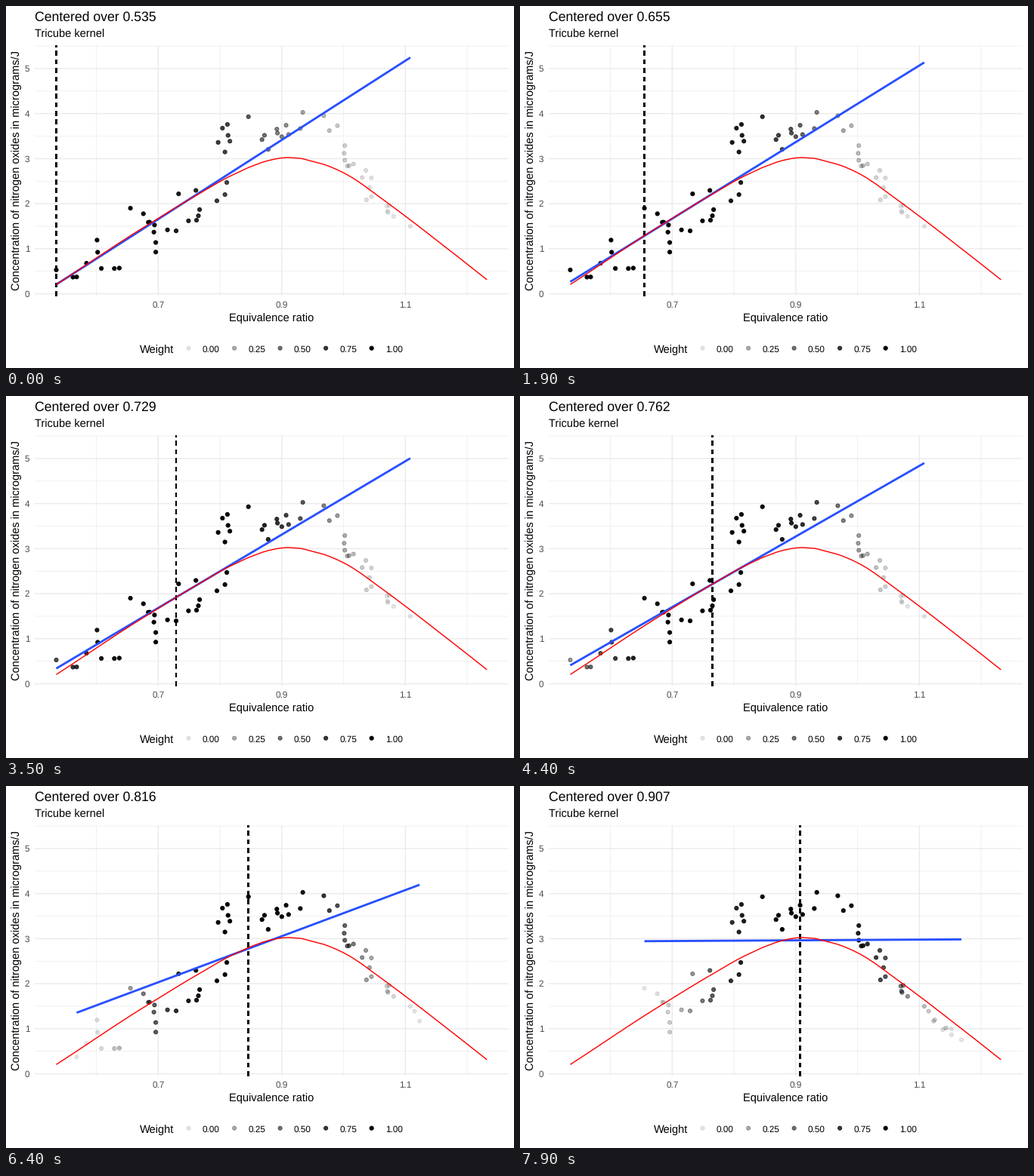
Recreate the animation shown at these times as a matplotlib script. Size 672 by 480 pixels, loop 8000 ms.

```python
import numpy as np
import matplotlib.pyplot as plt
from matplotlib.animation import FuncAnimation
from matplotlib.collections import LineCollection, PolyCollection

W, H, DPI = 672, 480, 96
FRAMES, INTERVAL = 80, 100
PX = 72 / DPI  # points per pixel
LEFT, RIGHT, TOP, BOTTOM = 38.0, 664.67, 52.2, 384.3
NEAREST = 66

plt.rcParams.update({"font.family": "Liberation Sans", "text.hinting": "none"})

# Engine exhaust data: equivalence ratio and nitrogen oxides
ratio = np.array([
    .535, .562, .568, .584, .601, .602, .608, .629, .637, .655, .676, .684,
    .686, .693, .694, .696, .696, .715, .729, .733, .749, .761, .762, .765,
    .767, .795, .797, .804, .808, .808, .811, .812, .813, .816, .846, .868,
    .872, .878, .892, .893, .9, .907, .911, .93, .934, .968, .977, .99,
    1.001, 1.002, 1.002, 1.006, 1.009, 1.016, 1.03, 1.036, 1.037, 1.042,
    1.045, 1.045, 1.07, 1.071, 1.072, 1.074, 1.081, 1.108, 1.115, 1.123,
    1.125, 1.138, 1.142, 1.144, 1.152, 1.152, 1.168])
nox = np.array([
    .53, .37, .374, .678, 1.192, .923, .563, .561, .571, 1.9, 1.777, 1.587,
    1.59, 1.369, 1.527, .926, 1.139, 1.419, 1.397, 2.219, 1.62, 2.295, 1.634,
    1.732, 1.869, 2.064, 3.361, 3.677, 3.148, 2.202, 2.471, 3.76, 3.517,
    3.388, 3.931, 3.423, 3.519, 3.206, 3.656, 3.567, 3.488, 3.741, 3.536,
    3.669, 4.028, 3.952, 3.623, 3.732, 3.12, 2.964, 3.29, 2.836, 2.845,
    2.881, 2.581, 2.739, 2.085, 2.358, 2.157, 2.571, 1.947, 1.836, 1.806,
    1.962, 1.719, 1.498, 1.39, 1.17, 1.2, .981, 1.013, 1.021, 1, .866, .756])

# The lean end falls off almost linearly
ratio = np.append(ratio, np.linspace(1.175, 1.232, 13))
nox = np.append(nox, np.linspace(.87, .55, 13))
centers = np.unique(ratio)


def px(x):
    return LEFT + (np.asarray(x) - .50015) * (RIGHT - LEFT) / .7667


def py(y):
    return 381.6 - 59.73 * np.asarray(y)


def local_fit(center):
    """Tricube-weighted line through the nearest points."""
    dist = np.abs(ratio - center)
    reach = np.sort(dist)[NEAREST - 1]
    near = dist <= reach + 1e-9
    x, y = ratio[near], nox[near]
    weight = (1 - np.minimum(dist[near] / reach, 1) ** 3) ** 3
    slope, level = np.polyfit(x, y, 1, w=np.sqrt(weight))
    return x, y, weight, slope, level


def smooth_curve(x):
    """Local regression at a few knots, blended with cubic Hermite pieces."""
    knots = np.array([.5315, .68, .7615, .8145, .932, 1.033, 1.1115, 1.178,
                      1.2355])
    fits = [local_fit(k)[3:] for k in knots]
    slope = np.array([f[0] for f in fits])
    value = np.array([f[0] * k + f[1] for f, k in zip(fits, knots)])
    i = np.searchsorted(knots, x) - 1
    h = knots[i + 1] - knots[i]
    t = (x - knots[i]) / h
    return ((1 + 2 * t) * (1 - t) ** 2 * value[i]
            + t * (1 - t) ** 2 * h * slope[i]
            + t * t * (3 - 2 * t) * value[i + 1]
            + t * t * (t - 1) * h * slope[i + 1])


def ink(weight):
    """Black with opacity running from 0.1 to 1."""
    rgba = np.zeros((len(weight), 4))
    rgba[:, 3] = .1 + .9 * np.asarray(weight)
    return rgba


def dashes(x, width=1.423):
    """Dashed vertical rule filling every pixel it touches."""
    x0, x1 = np.floor(x - width / 2), np.ceil(x + width / 2)
    dash = 4 * width
    boxes = []
    for low in np.arange(BOTTOM, TOP, -2 * dash):
        y0, y1 = np.floor(max(low - dash, TOP)), np.ceil(low)
        boxes.append([(x0, y0), (x1, y0), (x1, y1), (x0, y1)])
    return boxes


fig = plt.figure(figsize=(W / DPI, H / DPI), dpi=DPI, facecolor="white")
ax = fig.add_axes([0, 0, 1, 1])
ax.set(xlim=(0, W), ylim=(H, 0))
ax.axis("off")


def text(x, y, s, size, **kw):
    return ax.text(x, y, s, size=size, va="baseline",
                   rotation_mode="anchor", **kw)


def grid(xs, ys, width):
    lines = [[(x, TOP), (x, BOTTOM)] for x in px(xs)]
    lines += [[(LEFT, y), (RIGHT, y)] for y in py(ys)]
    grid_lines = LineCollection(lines, colors="#EBEBEB", linewidths=width * PX,
                                zorder=1, capstyle="butt")
    grid_lines.set_snap(False)
    ax.add_collection(grid_lines, autolim=False)


def dots(x, y, weight):
    color = ink(weight)
    return ax.scatter(x, y, s=(5.2 * PX) ** 2, facecolors=color,
                      edgecolors=color, linewidths=.945 * PX, zorder=2)


grid([.6, .8, 1, 1.2], np.arange(.5, 6), .71)
grid([.7, .9, 1.1], np.arange(6), 1.42)

for v in (.7, .9, 1.1):
    text(px(v), 400, f"{v}", 8.8, ha="center", color="#4D4D4D")
for v in range(6):
    text(31.4, py(v) + 4.2, f"{v}", 8.8, ha="right", color="#4D4D4D")
text((LEFT + RIGHT) / 2, 417.8, "Equivalence ratio", 11, ha="center")
text(17.8, (TOP + BOTTOM) / 2,
     "Concentration of nitrogen oxides in micrograms/J", 11,
     ha="center", rotation=90)
title = text(LEFT, 20, "", 13.2)
text(LEFT, 42, "Tricube kernel", 11)

text(177, 459.9, "Weight", 11)
levels = np.linspace(0, 1, 5)
key_x = 241.6 + 60.5 * np.arange(5)
dots(key_x, np.full(5, 453.7), levels)
for x, v in zip(key_x, levels):
    text(x + 18.4, 459, f"{v:.2f}", 8.8)

points = dots([], [], [])
blue, = ax.plot([], [], color="#2850FF", lw=2.845 * PX, zorder=3,
                solid_capstyle="butt")
rule = PolyCollection([], facecolors="black", linewidths=0, zorder=4)
ax.add_collection(rule, autolim=False)
ax.plot(px(centers), py(smooth_curve(centers)), color="red", lw=1.423 * PX,
        zorder=5, solid_capstyle="butt")


def update(frame):
    center = centers[frame // 2]
    x, y, weight, slope, level = local_fit(center)
    points.set_offsets(np.column_stack([px(x), py(y)]))
    points.set_facecolor(ink(weight))
    points.set_edgecolor(ink(weight))
    ends = np.array([x.min(), x.max()])
    blue.set_data(px(ends), py(slope * ends + level))
    rule.set_verts(dashes(px(center)))
    # The title trails the rule by one step
    title.set_text(f"Centered over {centers[max(frame - 1, 0) // 2]:g}")
    return points, blue, rule, title


anim = FuncAnimation(fig, update, frames=FRAMES, interval=INTERVAL,
                     repeat=True, repeat_delay=0)
plt.show()
```
